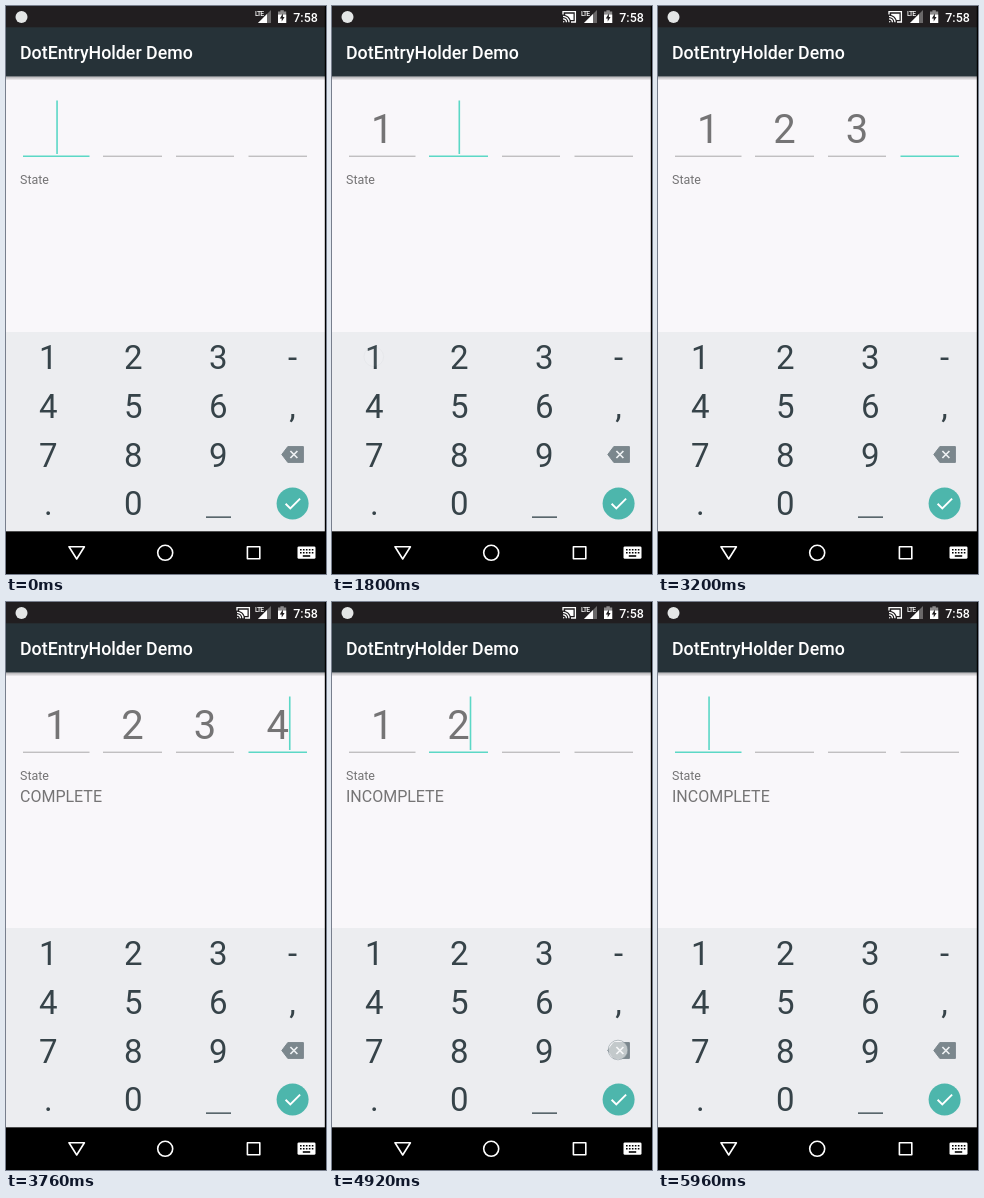
An HTML page that plays this animation: 320x568 px, repeating every 6.04 s.

```html
<!DOCTYPE html>
<html lang="en">
<head>
<meta charset="utf-8">
<title>Code entry</title>
<style>
  html, body { margin: 0; width: 100%; height: 100%; overflow: hidden; background: #000; }
  svg { display: block; width: 320px; height: 568px; font-family: Roboto, sans-serif; }
  .mid { text-anchor: middle; }
</style>
</head>
<body>
<svg viewBox="0 0 320 568">
  <defs>
    <linearGradient id="shade" x1="0" y1="0" x2="0" y2="1">
      <stop offset="0" stop-color="#000" stop-opacity=".3"/>
      <stop offset="1" stop-color="#000" stop-opacity="0"/>
    </linearGradient>
  </defs>

  <rect width="320" height="568" fill="#f9f7fa"/>
  <rect y="70.5" width="320" height="4" fill="url(#shade)"/>
  <rect y="21" width="320" height="49.5" fill="#263238"/>
  <rect width="320" height="21.3" fill="#211e20"/>
  <text x="14" y="53" font-size="17.78" font-weight="500" fill="#fff">DotEntryHolder Demo</text>

  <!-- status bar -->
  <circle cx="15.5" cy="11" r="6" fill="#e4e6e6"/>
  <g id="cast" fill="none" stroke="#fff" stroke-width="1.3">
    <path d="M231 8.5V5.7H243.4V16H239"/>
    <path d="M231 10.3a6 6 0 0 1 6 6M231 12.9a3.4 3.4 0 0 1 3.4 3.4"/>
    <path d="M233.2 7.7H241.5V14H238.6Q237.2 10 233.2 8.9Z" fill="#fff" stroke="none"/>
    <circle cx="231.7" cy="15.7" r=".7" fill="#fff" stroke="none"/>
  </g>
  <path d="M252 17H265V4Z" fill="#6a6869"/>
  <path d="M252 17H261V8Z" fill="#fff"/>
  <text x="249" y="9.8" font-size="6.8" font-weight="500" letter-spacing="-1" fill="#fff">LTE</text>
  <path d="M272 5.6H274.4V4.2H277.8V5.6H280.2V17H272Z" fill="#8d8b8c"/>
  <path d="M272 8.6H280.2V17H272Z" fill="#fff"/>
  <path d="M276.9 7.5L273.8 12.4H275.7V15.6L278.6 10.9H276.9Z" fill="#211e20"/>
  <text x="287.3" y="15.6" font-size="12.44" font-weight="500" fill="#fff">7:58</text>

  <g id="fields"></g>
  <rect id="cursor" y="94.5" width="1.6" height="53.5" fill="#5cd8c6"/>
  <text x="14" y="177.6" font-size="12.44" fill="#757475">State</text>
  <text id="status" x="14" y="200.3" font-size="16" fill="#757475"></text>

  <!-- keyboard -->
  <rect y="326" width="320" height="200" fill="#ecedf0"/>
  <rect id="press" height="37" fill="#ced3d6"/>
  <g id="keys" class="mid" font-size="33" fill="#364349"></g>
  <rect x="200" y="510.4" width="25" height="1.5" fill="#4a585f"/>
  <path d="M275.8 448.5L281.8 440.6H297.4V456.4H281.8Z" fill="#7b878d" stroke="#7b878d" stroke-linejoin="round"/>
  <path d="M284.4 445l7 7m0-7l-7 7" stroke="#eef1f3" stroke-width="1.7"/>
  <circle cx="286.6" cy="497.5" r="16" fill="#4db6ac"/>
  <path d="M279.6 497.8l4.7 4.6l9.8-9.8" fill="none" stroke="#fff" stroke-width="1.9"/>
  <circle id="touch" r="9.8" fill="#fff" fill-opacity=".58" stroke="#87939a" stroke-opacity=".6" stroke-width="1"/>

  <!-- navigation bar -->
  <rect y="525.33" width="320" height="43" fill="#000"/>
  <g fill="none" stroke="#fff" stroke-width="1.6" stroke-linejoin="round">
    <path d="M63 540.8H78.4L70.7 553Z"/>
    <circle cx="159.2" cy="546.8" r="7.5"/>
    <rect x="241.4" y="540.8" width="12.4" height="12"/>
  </g>
  <rect x="291.5" y="540.4" width="18" height="12.4" rx="1.4" fill="#fff"/>
  <path d="M294 543.8H307.5M294 546.7H307.5" stroke="#000" stroke-width="1.6" stroke-dasharray="1.6 1.35"/>
  <path d="M296.8 550H304.2" stroke="#000" stroke-width="1.6"/>
  <rect x="318.8" width="1.2" height="568" fill="#000"/>
</svg>
<script>
const LOOP = 6040, STEP = 40, BLINK = 500, FADE = 200;
const $ = id => document.getElementById(id);

function add(parent, tag, attrs, text = "") {
  const el = document.createElementNS("http://www.w3.org/2000/svg", tag);
  for (const name in attrs) el.setAttribute(name, attrs[name]);
  el.textContent = text;
  parent.appendChild(el);
  return el;
}
const set = (el, attrs) => { for (const name in attrs) el.setAttribute(name, attrs[name]); };
const show = (el, on) => set(el, { visibility: on ? "visible" : "hidden" });

// Code fields: left and right end of each underline
const fields = [[17, 83.5], [97, 156], [170, 228], [242.5, 301]].map(([a, b]) => ({
  cx: (a + b) / 2,
  line: add($("fields"), "rect", { x: a, width: b - a }),
  digit: add($("fields"), "text", { x: (a + b) / 2, y: 136.5, class: "mid", "font-size": 40, fill: "#757475" })
}));

// Keypad
const cols = [42.3, 127.3, 212.3, 286.5], rows = [351.7, 400.3, 449, 497.8];
["123-", "456,", "789", ".0"].forEach((row, r) => [...row].forEach((ch, c) =>
  add($("keys"), "text", { x: cols[c], y: rows[r] + 11.6 }, ch)));

// Touches: finger down, finger up, column, row
const touches = [
  [1540, 1620, 0, 0], [2120, 2220, 1, 0], [2600, 2690, 2, 0], [3440, 3540, 0, 1],
  [4280, 4390, 3, 2], [4800, 4910, 3, 2], [5200, 5320, 3, 2], [5640, 5750, 3, 2]
];

// Entry states: start, digits, focused field, status. Digits land on release, deletion on press.
const states = [
  [-300, "", 0, ""], [1620, "1", 1, ""], [2220, "12", 2, ""], [2690, "123", 3, ""],
  [3540, "1234", 3, "COMPLETE"], [4280, "123", 2, "INCOMPLETE"], [4800, "12", 1, "INCOMPLETE"],
  [5200, "1", 0, "INCOMPLETE"], [5640, "", 0, "INCOMPLETE"]
];

function render(t) {
  const [start, code, focus, status] = states.filter(s => s[0] <= t).pop();
  fields.forEach((f, i) => {
    const on = i === focus;
    f.digit.textContent = code[i] || "";
    set(f.line, { y: on ? 149.5 : 149.7, height: on ? 1.5 : 1, fill: on ? "#5cd8c6" : "#aaa8aa" });
  });
  $("status").textContent = status;
  set($("cursor"), { x: fields[focus].cx + (code[focus] ? 11.2 : 0) });
  show($("cursor"), (t - start) % (2 * BLINK) < BLINK);
  show($("cast"), t >= 80);

  const hit = touches.find(([down, up]) => t >= down && t < up + FADE);
  show($("touch"), hit);
  show($("press"), hit && t < hit[1]);
  if (!hit) return;
  const [, up, c, r] = hit, width = c === 3 ? 59 : 79;
  set($("press"), { x: cols[c] - width / 2, y: rows[r] - 18.7, width });
  set($("touch"), { cx: cols[c] - 0.5, cy: rows[r] - 1, opacity: Math.min(1, 1 - (t - up) / FADE) });
}

const origin = performance.now();
function tick() {
  const t = (performance.now() - origin) % LOOP;
  render(Math.floor(t / STEP) * STEP);
  requestAnimationFrame(tick);
}
tick();
</script>
</body>
</html>
```
